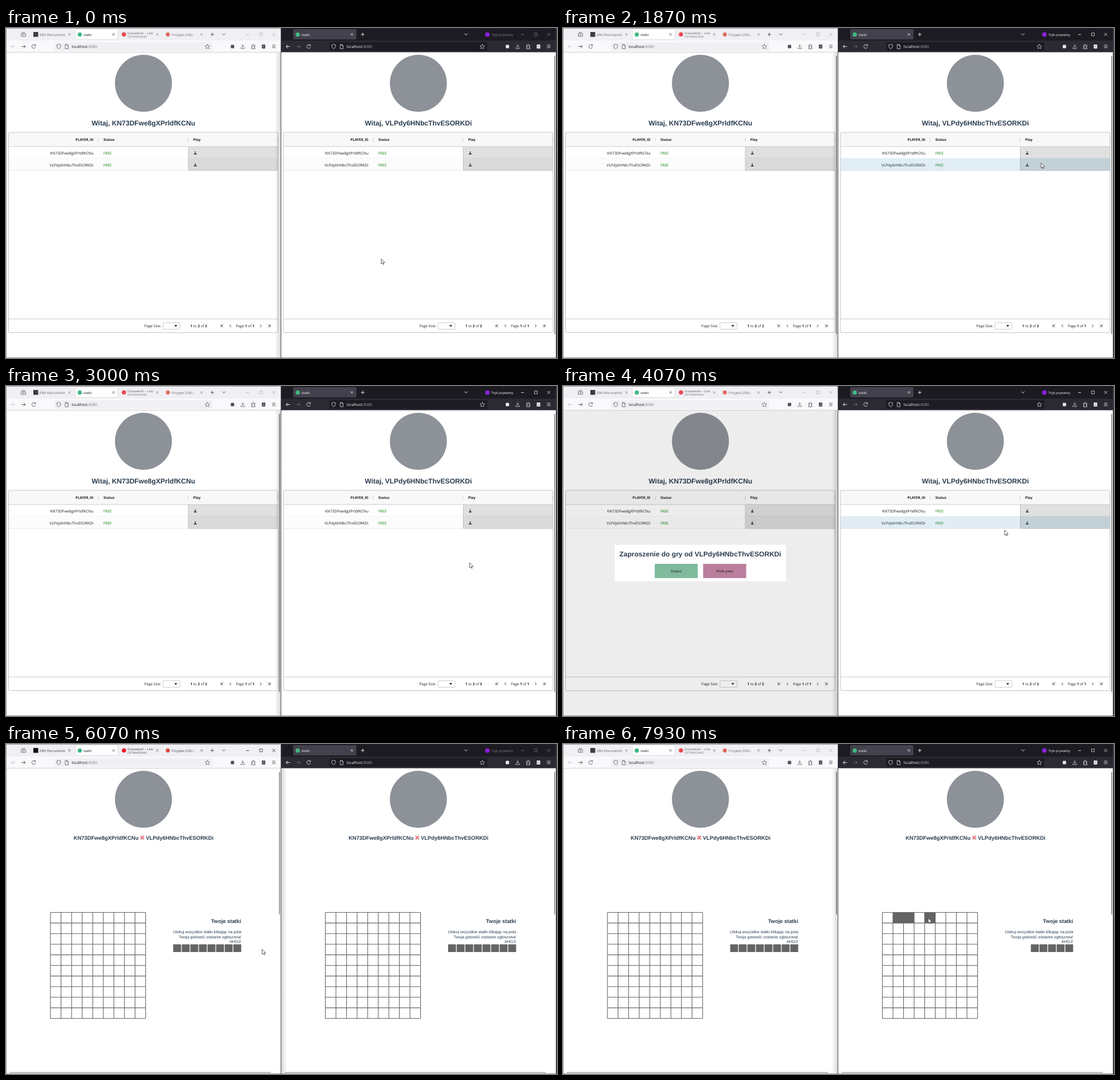
An HTML page for the animation above (8000 ms loop, 967 by 579 pixels).

```html
<!DOCTYPE html>
<html lang="pl">
<head>
<meta charset="utf-8">
<title>statki</title>
<style>
html, body { margin: 0; width: 100%; height: 100%; overflow: hidden; background: #fff; }
svg { display: block; }
text { font-family: "Open Sans", "Noto Sans", sans-serif; text-rendering: geometricPrecision; white-space: pre; }
.h { font-family: "Liberation Sans", Arial, sans-serif; font-weight: 700; fill: #2c3e50; }
.p { font-family: "Liberation Sans", Arial, sans-serif; fill: #2c3e50; }
.b { font-weight: 700; }
.mid { text-anchor: middle; }
.end { text-anchor: end; }
</style>
</head>
<body>
<svg id="stage" width="967" height="579" viewBox="0 0 967 579"></svg>
<script>
const DX = 482.5;
const ID = ['KN73DFwe8gXPrldfKCNu', 'VLPdy6HNbcThvESORKDi'];
const CELL_W = 18.56, CELL_H = 18.6, GREY = '#646464';

const rect = (x, y, w, h, fill, more = '') => `<rect x="${x}" y="${y}" width="${w}" height="${h}" fill="${fill}" ${more}/>`;
const line = (d, color, w = 1, more = '') => `<path d="${d}" fill="none" stroke="${color}" stroke-width="${w}" ${more}/>`;
const dot = (x, y, r, fill) => `<circle cx="${x}" cy="${y}" r="${r}" fill="${fill}"/>`;
const text = (x, y, size, str, fill, cls = '') =>
  `<text x="${x}" y="${y}" font-size="${size}" class="${cls}" ${fill ? `fill="${fill}"` : ''}>${str}</text>`;
const group = (id, body, x = 0) => `<g id="${id}" transform="translate(${x})">${body}</g>`;
const cross = (x, y, r, color, w = .8) => line(`M${x - r} ${y - r}l${2 * r} ${2 * r}m0 ${-2 * r}l${-2 * r} ${2 * r}`, color, w);
const plus = (x, y, color) => line(`M${x - 3} ${y}h6m-3 -3v6`, color, .9);
const chevron = (x, y, color) => line(`M${x - 2.8} ${y - 1.4}l2.8 2.8 2.8 -2.8`, color, .9);

function arrow(x, color, dir) {
  return line(`M${x - 3.5 * dir} 32.5h${7 * dir}m${-3 * dir} -3l${3 * dir} 3 ${-3 * dir} 3`, color, .9);
}

function toolbar(c) {
  return rect(85, 25, 277, 15, c.field, 'rx="2"')
    + arrow(12.5, c.back, -1) + arrow(30.5, c.next, 1)
    + line('M51.3 30.4a3.3 3.3 0 1 0 .5 3M51.8 28.6v2.4h-2.4', c.icon, .9)
    + line('M92.5 28.6l3.3 1.1v2.2q0 3 -3.3 4.7q-3.3 -1.7 -3.3 -4.7v-2.2z', c.icon, .8)
    + line('M104 28.8h3.2l2 2v5.6h-5.2zm3 0v2.2h2.2', c.icon, .8)
    + text(115.3, 34.8, 6.65, `localhost<tspan fill="${c.faint}">:8080</tspan>`, c.text)
    + line('M353.5 28.5l1.2 2.6 2.9.3 -2.1 2 .6 2.9 -2.6 -1.5 -2.6 1.5 .6 -2.9 -2.1 -2 2.9 -.3z', c.icon, .7)
    + rect(394.5, 29.5, 6, 6, c.icon, 'rx="1.5"')
    + line('M415.5 28.5v5m-2.2 -2.2l2.2 2.2 2.2 -2.2M412.3 34v2h6.4v-2', c.icon, .8)
    + line('M431 30.5h2v-1.5h2v1.5h2v2h-1.5v2h1.5v2h-6v-2.4h1.5v-1.6h-1.5z', c.icon, .8)
    + rect(449, 29, 6, 7, c.box, 'rx=".8"') + line('M450.2 31h3.6m-3.6 1.6h3.6m-3.6 1.6h3.6', c.bar, .4)
    + line('M467 30h6m-6 2.3h6m-6 2.3h6', c.icon, .8);
}

const controls = (c) => line('M421.5 11.5h5', c, .8) + line('M445 8.7h5v5h-5z', c, .7) + cross(470, 11.3, 2.5, c);

const LIGHT = { field: '#f0f0f4', back: '#c4c4ca', next: '#45454d', icon: '#50505a', text: '#15141a', faint: '#81818a', box: '#44444c', bar: '#f9f9fb' };
const DARK = { field: '#1c1b22', back: '#fbfbfe', next: '#6d6c75', icon: '#e4e4ea', text: '#fbfbfe', faint: '#a5a4ac', box: '#fbfbfe', bar: '#2b2a33' };

const leftChrome = rect(0, 0, 482, 22, '#f0f0f4') + rect(0, 22, 482, 20, '#f9f9fb') + line('M0 42.5h482', '#cfcfd4')
  + line('M27.5 8h6m-6.8 2h7.6v4.6h-7.6zm2.2 2.3h3', '#50505a', .8)
  + rect(121.5, 2, 75, 18, '#fff', 'rx="2" stroke="#d6d6dc" stroke-width=".7"')
  + dot(129.5, 11.5, 3.7, '#41b883') + text(136, 13.6, 5.8, 'statki', '#15141a') + cross(188.7, 11.3, 2, '#45454d')
  + group('tabsL', rect(48, 7, 8.5, 8.5, '#111')
    + text(59, 13.6, 5.8, 'EBN Warsztatnik', '#45454d') + cross(111.3, 11.3, 2, '#55555e')
    + dot(207, 11.3, 3.8, '#e8202a')
    + text(213, 10.5, 5.8, 'Grauwesel – Live', '#45454d') + text(213, 17, 4.9, 'ODTWARZANIE', '#55555e')
    + rect(260, 3, 3, 16, '#f0f0f4') + cross(265.5, 11.3, 2, '#55555e')
    + dot(284, 11.3, 3.6, '#dd4b3e') + text(291, 13.6, 5.8, 'Przyjęte (236) -', '#45454d')
    + rect(338, 3, 3, 16, '#f0f0f4') + cross(343.2, 11.3, 2, '#55555e'))
  + plus(362, 11.3, '#45454d') + chevron(382.3, 11, '#45454d')
  + group('ctlL', controls('#15141a')) + toolbar(LIGHT);

const rightChrome = rect(.5, 0, 484, 22, '#1c1b22') + rect(.5, 22, 484, 20.5, '#2b2a33')
  + rect(21.5, 2, 111, 18, '#42414d', 'rx="2"')
  + dot(29.5, 11.5, 3.7, '#41b883') + text(36, 13.6, 5.8, 'statki', '#fbfbfe') + cross(124.5, 11.3, 2, '#fbfbfe')
  + plus(143.5, 11.3, '#fbfbfe') + chevron(324.8, 11, '#fbfbfe')
  + dot(362.3, 11.5, 4, '#8a20d8')
  + group('ctlR', text(369.3, 13.7, 5.8, 'Tryb prywatny', '#fbfbfe') + controls('#fbfbfe')) + toolbar(DARK);

const crest = dot(241.2, 97, 50, '#8d9198');

function lobby(id) {
  const row = (y, name, bg, cell) => rect(5, y, 315, 21, bg) + rect(320, y, 157.5, 21, cell)
    + line(`M5 ${y + 21}h315`, '#dde2e6', .8) + line(`M320 ${y + 21}h157.5M320 ${y}v21`, '#b4b8bc', .8)
    + text(153.5, y + 13.6, 6.55, name, '#181d1f', 'end') + text(171, y + 13.6, 6.4, 'FREE', '#0a800a')
    + line(`M332.2 ${y + 8.6}v4.2`, '#181d1f', 1.2) + line(`M329.8 ${y + 13}h4.8`, '#181d1f', 1.5);
  const nav = (x, dir, bar) => line(`M${x + dir} 520.4l${-2.2 * dir} 2.2 ${2.2 * dir} 2.2`, '#181d1f', .9)
    + (bar ? line(`M${x - 2.4 * dir} 520.2v4.8`, '#181d1f', .9) : '');
  return crest + text(241.2, 170.6, 12.08, 'Witaj, ' + id, '', 'h mid')
    + rect(5, 183, 472.5, 25, '#f8f8f8')
    + row(208, ID[0], '#fff', '#e0e0e0') + row(229, ID[1], '#fcfcfc', '#dadada')
    + line('M5 208h472.5M5 510.5h472.5', '#babfc7', .8)
    + line('M162 192v8M319.5 192v8M476.7 192v8', '#c8ccd2', .8)
    + rect(4.5, 183, 473, 351.5, 'none', 'rx="2" stroke="#babfc7" stroke-width=".9"')
    + text(153.5, 198.4, 6.1, 'PLAYER_ID', '#181d1f', 'b end') + text(171, 198.4, 6.1, 'Status', '#181d1f', 'b')
    + text(328.6, 198.4, 6.1, 'Play', '#181d1f', 'b')
    + text(272.3, 525, 6.4, 'Page Size:', '#181d1f', 'end')
    + rect(275.5, 517, 30, 11.6, '#fff', 'rx="1.5" stroke="#babfc7" stroke-width=".8"')
    + '<path d="M295.4 521.3h5.2l-2.6 3.2z" fill="#181d1f"/>'
    + text(323.5, 525, 6.3, '<tspan class="b">1</tspan> to <tspan class="b">2</tspan> of <tspan class="b">2</tspan>', '#181d1f')
    + nav(380, 1, true) + nav(394, 1) + nav(447, -1) + nav(461, -1, true)
    + text(403.5, 525, 6.3, 'Page <tspan class="b">1</tspan> of <tspan class="b">1</tspan>', '#181d1f');
}

function game(side) {
  let grid = '';
  for (let c = 0; c <= 9; c++) grid += `M${78 + c * CELL_W} 295.5v186`;
  for (let r = 0; r <= 10; r++) grid += `M78 ${295.5 + r * CELL_H}h167`;
  let ships = '';
  for (let i = 0; i < 8; i++) ships += rect(293.4 + i * 15.08, 351.5, 13.8, 13.5, GREY, `id="ship${side}${i}"`);
  const cells = [1, 2, 4].map((c, i) =>
    rect(78 + c * CELL_W, 295.5, CELL_W, CELL_H, GREY, `id="cell${side}${i}" visibility="hidden"`)).join('');
  const swords = line('M236 161l5.6 5.6M242.4 161l-5.6 5.6', '#d8343e', 1.1)
    + line('M235.6 165.4l2.6 2.6M242.8 165.4l-2.6 2.6', '#b02a36', .9);
  return crest + text(118.7, 168, 9.42, ID[0], '', 'h') + swords + text(364.2, 168, 9.42, ID[1], '', 'h end')
    + line(grid, GREY, 1.1) + cells
    + text(412.8, 313.5, 9.4, 'Twoje statki', '', 'h end')
    + text(412.8, 332, 7.03, 'Ulokuj wszystkie statki klikając na pola', '', 'p end')
    + text(412.8, 340.7, 7.03, 'Twoja gotowść zostanie zgłoszona!', '', 'p end')
    + text(412.8, 349.4, 7.03, 'AHOJ!', '', 'p end') + ships
    + line('M6.5 576.3h458.5', '#777', 1);
}

const invite = rect(1, 43, 481, 535, '#000', 'opacity=".07"')
  + rect(90, 278, 302, 65.5, '#fff', 'stroke="#e2e2e2" stroke-width=".6"')
  + text(241, 299, 12.05, 'Zaproszenie do gry od ' + ID[1], '', 'h mid')
  + rect(161, 312, 75.5, 25, '#7fba9c', 'id="join"') + rect(246, 312, 75.5, 25, '#bb7f9d')
  + text(198.7, 327.2, 6.2, 'Dolacz', '#111', 'mid') + text(283.8, 327.2, 6.2, 'Wole piwo', '#111', 'mid');

const alertBox = rect(483, 42.5, 482, 536, '#1c1b22', 'opacity=".45"')
  + rect(620, 278, 207, 68, '#000', 'rx="5" opacity=".15"')
  + rect(621.2, 278, 205, 65.7, '#42414d', 'rx="4"')
  + line('M629.8 290.3h7.2M633.4 286.7v7.2M630.6 288.4h5.6M630.6 292.2h5.6', '#fbfbfe', .5)
  + '<circle cx="633.4" cy="290.3" r="3.6" fill="none" stroke="#fbfbfe" stroke-width=".8"/>'
  + '<ellipse cx="633.4" cy="290.3" rx="1.7" ry="3.6" fill="none" stroke="#fbfbfe" stroke-width=".5"/>'
  + text(639, 292.5, 5.65, 'localhost:8080', '#fbfbfe', 'b')
  + text(629, 310.3, 5.73, 'You cannot play with yourself. Find an oppenent and try again', '#fbfbfe')
  + rect(796, 318, 24, 19, '#42414d', 'rx="2.5" stroke="#00ddff" stroke-width="1.2"')
  + rect(797.3, 319.3, 21.4, 16.4, '#aaf2ff', 'rx="1.5"')
  + text(808, 329.8, 5.75, 'OK', '#2b2a33', 'mid');

const pointer = '<path id="arrow" d="M0 0V8.8L2.1 7 3.5 10 4.9 9.4 3.6 6.4H6.3Z" fill="#fff" stroke="#222" stroke-width=".7"/>'
  + '<path id="hand" d="M1.2 .8Q2.1 -.4 2.9 .8V4L6.4 5V8.5L5.5 11H1.8L-1 7Q-1 5.6 1.2 7Z" fill="#fff" stroke="#222" stroke-width=".7"/>';

const stage = document.getElementById('stage');
stage.innerHTML = `<defs><linearGradient id="fade"><stop stop-color="#000" stop-opacity="0"/><stop offset="1" stop-color="#000" stop-opacity=".16"/></linearGradient></defs>`
  + rect(0, 0, 967, 579, '#fff')
  + group('lobbyL', lobby(ID[0])) + group('lobbyR', lobby(ID[1]), DX)
  + group('gameL', game('L')) + group('gameR', game('R'), DX)
  + rect(487.5, 208, 472.5, 21, '#2080b8', 'id="hover" opacity=".12"')
  + rect(479.3, 49, 1.4, 488, '#707070', 'id="barL"') + rect(962.2, 49, 1.4, 488, '#707070', 'id="barR"')
  + group('invite', invite) + group('alert', alertBox)
  + group('shadeL', rect(472, 43, 10, 535, 'url(#fade)'))
  + group('shadeR', rect(-493, 43, 10, 535, 'url(#fade)', 'transform="scale(-1 1)"'))
  + leftChrome + group('chromeR', rightChrome, DX)
  + line('M.5 579V.5H482M0 578.5H967', '#8c8c90', .9) + line('M482.6 0V579', '#4a4a50', 1)
  + rect(965, 0, 2, 579, '#3c3b44')
  + group('cursor', pointer);

const el = Object.fromEntries([...stage.querySelectorAll('[id]')].map(e => [e.id, e]));
const show = (id, on) => el[id].setAttribute('visibility', on ? 'visible' : 'hidden');
const ramp = (k, a) => Math.min(1, Math.max(0, (k - a) / 3));

// All times below count ticks of 1/15 s.
const PATH = [
  [0, 658.5, 405], [7, 658.5, 405], [11, 393, 287], [12, 393, 287], [24, 836, 238], [25, 836, 238],
  [26, 839, 237], [33, 839, 237], [43, 813, 323], [44, 813, 323], [45, 813.5, 310], [46, 814, 302],
  [56, 826, 219], [59, 826, 219], [60, 812, 233], [61, 775, 253], [71, 197, 325], [72, 197, 325],
  [75, 202, 328], [84, 202, 328], [91, 449.5, 360], [97, 523, 400], [107, 588, 302], [108, 588, 302],
  [110, 602, 304], [111, 602, 304], [113, 604, 305], [116, 641, 305.5], [120, 641, 305.5]
];
const HOVER = [[0, 0], [21, 2], [45, 0], [52, 2], [55, 1], [60, 2], [62, 0]];
const SHOTS = [108, 113, 118];

function mouse(k) {
  const i = Math.max(1, PATH.findIndex(p => p[0] >= k));
  const [a, x, y] = PATH[i - 1], [b, u, v] = PATH[i];
  const f = (k - a) / (b - a);
  return [x + (u - x) * f, y + (v - y) * f];
}

function draw(k) {
  const playing = k >= 80;
  for (const s of 'LR') { show('lobby' + s, !playing); show('game' + s, playing); }

  const left = ramp(k, 78) * (1 - ramp(k, 107));
  const right = ramp(k, 0) * (1 - ramp(k, 78)) + ramp(k, 107);
  el.ctlL.setAttribute('opacity', .32 + .68 * left);
  el.tabsL.setAttribute('opacity', .8 + .2 * left);
  el.ctlR.setAttribute('opacity', .45 + .55 * right);
  show('shadeL', left < .5);
  show('shadeR', left >= .5);

  const row = HOVER.filter(h => h[0] <= k).pop()[1];
  show('hover', row);
  el.hover.setAttribute('y', row === 2 ? 229 : 208);
  show('alert', k >= 29 && k < 45);
  show('invite', k >= 57 && !playing);
  el.join.setAttribute('fill', k >= 70 ? '#6aac8a' : '#7fba9c');
  show('barL', k >= 2 && (k < 57 || k >= 68));
  for (const s of 'LR') el['bar' + s].setAttribute('height', playing ? 250 : 488);

  const placed = SHOTS.filter(s => k >= s).length;
  SHOTS.forEach((s, i) => show('cellR' + i, k >= s));
  for (let i = 0; i < 8; i++) show('shipR' + i, playing && i >= placed);
  for (let i = 0; i < 8; i++) show('shipL' + i, playing);

  const hand = k >= 42 && k < 45;
  show('hand', hand);
  show('arrow', !hand);
  el.cursor.setAttribute('transform', `translate(${mouse(k)})`);
}

const start = performance.now();
function tick() {
  const t = (performance.now() - start) % 8000;
  draw(Math.min(119, Math.floor((t + 5) * 15 / 1000)));
  requestAnimationFrame(tick);
}
tick();
</script>
</body>
</html>
```
